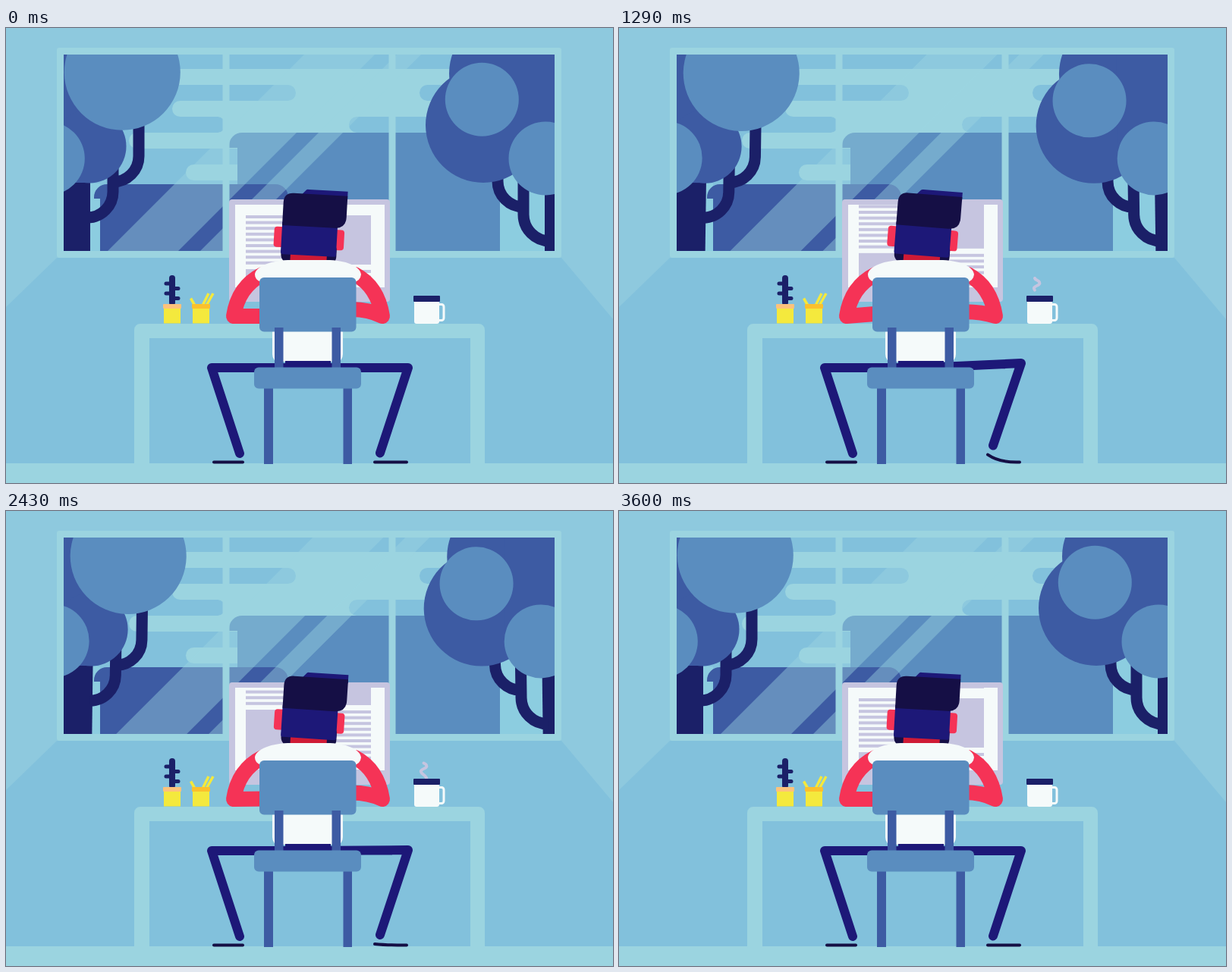
These frames come from a looping animation (800 by 600 pixels, 3630 ms). An HTML page:

```html
<!DOCTYPE html>
<html lang="en">
<head>
<meta charset="utf-8">
<title>At the desk</title>
<style>
html, body { margin: 0; width: 100%; height: 100%; overflow: hidden; background: #82c1dc }
svg { display: block; width: 800px; height: 600px }
.sky { fill: #82c1dc } .pale { fill: #9bd4e0 } .mid { fill: #5a8dbf } .deep { fill: #3d5ba3 }
.navy { fill: #1d1878 } .ink { fill: #150f45 } .white { fill: #f5fafa } .red { fill: #f53356 }
.lilac { fill: #c6c5e0 } .yellow { fill: #f4e93d } .wood { fill: #1b2068 }
.line { fill: none; stroke-linecap: round; stroke-linejoin: round }
.branch { fill: none; stroke: #1b2068; stroke-width: 15 }
.arm { stroke: #f53356; stroke-width: 20 }
.leg { stroke: #1d1878; stroke-width: 12 }
.foot { stroke: #150f45; stroke-width: 4 }
</style>
</head>
<body>
<svg viewBox="0 0 800 600">
  <defs>
    <clipPath id="pane"><path d="M76 35H723V294H76z"/></clipPath>
    <clipPath id="screen"><path d="M302 233H499V342H302z"/></clipPath>
  </defs>

  <!-- room -->
  <path class="sky" d="M0 0H800V600H0z"/>
  <path fill="#8ec9de" d="M0 0H800V384L732 303H67L0 368z"/>
  <path class="pale" d="M0 574H800V600H0z"/>

  <!-- view -->
  <g clip-path="url(#pane)">
    <path class="sky" d="M76 35H723V294H76z"/>
    <path fill="#8ccde0" d="M76 205H124V294H76zM651 138H723V294H651z"/>
    <g class="pale">
      <path d="M200 54H600V75H200zM280 54H600V138H280z"/>
      <rect x="219" y="96" width="381" height="21" rx="10.5"/>
      <rect x="162" y="138" width="180" height="21" rx="10.5"/>
      <rect x="237" y="180" width="90" height="21" rx="10.5"/>
    </g>
    <g class="sky">
      <rect x="150" y="75" width="232" height="21" rx="10.5"/>
      <rect x="545" y="75" width="80" height="21" rx="10.5"/>
      <rect x="150" y="117" width="139" height="21" rx="10.5"/>
      <rect x="452" y="117" width="130" height="21" rx="10.5"/>
    </g>
    <path class="mid" d="M294 158V155A17 17 0 0 1 311 138H651V294H305V158z"/>
    <path class="deep" d="M116 225V223A17 17 0 0 1 133 206H355A17 17 0 0 1 372 223V294H124V225z"/>
    <path id="glare" class="pale" opacity=".42" d="M393 35H486L227 294H134zM515 35H547L288 294H256z"/>

    <g class="trunk">
      <path class="wood" d="M66 195H111V300H66z"/>
      <path class="branch" d="M175 120V169a34 34 0 0 1-34 34M141 180V216a34 34 0 0 1-34 34"/>
    </g>
    <g class="shade deep">
      <path d="M70 15H150V156H110V204H70z"/>
      <circle cx="110" cy="156" r="48.5"/>
    </g>
    <g class="leaf mid">
      <circle cx="153.3" cy="58.3" r="76.5"/>
      <circle cx="55.3" cy="172" r="48.5"/>
    </g>

    <g class="trunk" data-side="-1">
      <path class="wood" d="M710 205H735V300H710z"/>
      <path class="branch" d="M648 185V202a34 34 0 0 0 34 34M682 195V246a35 35 0 0 0 35 35"/>
    </g>
    <g class="shade deep" data-side="-1">
      <circle cx="660.5" cy="60" r="76.5"/>
      <circle cx="629" cy="128" r="76"/>
      <path d="M660 15H731V172H660z"/>
    </g>
    <g class="leaf mid" data-side="-1">
      <circle cx="627.3" cy="94.3" r="48.5"/>
      <circle cx="711" cy="172" r="48.5"/>
    </g>
  </g>
  <path class="pale" fill-rule="evenodd" d="M70 26H729a3 3 0 0 1 3 3V300a3 3 0 0 1-3 3H70a3 3 0 0 1-3-3V29a3 3 0 0 1 3-3zM76 35V294H285.500V35zM294.500 35V294H504.500V35zM513.500 35V294H723V35z"/>

  <!-- monitor -->
  <rect class="lilac" x="294" y="226" width="212" height="135" rx="4"/>
  <path class="white" d="M302 233H499V342H302z"/>
  <g clip-path="url(#screen)"><g id="page" class="lilac"></g></g>

  <!-- desk and things on it -->
  <path class="pale" d="M169 574V398a8 8 0 0 1 8-8H623a8 8 0 0 1 8 8V574H612V409H189V574z"/>
  <g class="line" stroke="#1b2068">
    <path stroke-width="8" d="M219 330V362"/>
    <path stroke-width="5" d="M211 337H219M219 343.500H227M211 350H219M219 356.500H227"/>
  </g>
  <path fill="none" stroke="#f4e93d" stroke-width="3.500" d="M243.500 356.500L249 366M259 366L267 350M264 366L273 350"/>
  <path class="yellow" d="M208 368H230V389.500H208zM246 368H268V389.500H246z"/>
  <rect fill="#fcc27c" x="207" y="364" width="24" height="6" rx="1"/>
  <rect fill="#fbc02d" x="245" y="364" width="24" height="6" rx="1"/>
  <path id="steam" class="line" stroke="#c6c5e0" stroke-width="4" pathLength="100" d="M553 356C558 349 545 347 547 342.500C549 339 556 340 554 335C553 332.500 549 333 548 330"/>
  <path class="white" d="M538 359H571V387a3 3 0 0 1-3 3H541a3 3 0 0 1-3-3z"/>
  <rect class="line" x="565" y="364.500" width="12" height="21" rx="3" stroke="#f5fafa" stroke-width="3"/>
  <rect class="wood" x="537" y="353" width="35" height="8" rx="1"/>

  <!-- person -->
  <path id="armL" class="line arm"/>
  <path id="armR" class="line arm"/>
  <g id="head">
    <rect class="red" x="351" y="264" width="16" height="27" rx="4"/>
    <rect class="red" x="428" y="264" width="15.500" height="27" rx="4"/>
    <rect class="ink" x="361.500" y="280" width="73" height="32" rx="12"/>
    <path fill="#cf1a35" d="M374 298H422V312H374z"/>
    <path class="navy" d="M383 222L390 214Q391 213 393 213H445V224z"/>
    <path class="navy" d="M361 258H434V297a3 3 0 0 1-3 3H364a3 3 0 0 1-3-3z"/>
    <path class="ink" d="M361 262V232Q361 219 374 219H445V247Q445 262 430 262z"/>
  </g>
  <path class="white" d="M328 325C329 314 350 306 376 306H422C448 306 467 314 468 325Q467 333 459 335L444 350V430Q444 440 434 440H361Q351 440 351 430V350L336 335Q328 332 328 325z"/>
  <path class="navy" d="M368 439H428V452H368z"/>
  <path class="line leg" d="M400 448H271L308 561"/>
  <path id="legR" class="line leg"/>
  <path class="line foot" d="M274 572.500H312"/>
  <path id="footR" class="line foot"/>

  <!-- chair -->
  <rect class="mid" x="334" y="329" width="127.500" height="71.500" rx="6"/>
  <path class="deep" d="M354 395H365.500V450H354zM429.500 395H441V450H429.500zM340 474H352V575H340zM444.500 474H456V575H444.500z"/>
  <rect class="mid" x="327" y="447.500" width="141" height="28" rx="6"/>
</svg>

<script>
const LOOP = 3630, CYCLE = 3600, TAU = Math.PI * 2;
const $ = id => document.getElementById(id);
const set = (id, name, value) => $(id).setAttribute(name, value);
const clamp = x => Math.min(1, Math.max(0, x));
const ease = x => (x = clamp(x), x * x * (3 - 2 * x));

// page: a text column beside a picture, swapping sides
const rect = (x, y, w, h) => `<rect x="${x}" y="${y}" width="${w}" height="${h}"/>`;
const text = (x, y) => Array.from({ length: 9 }, (_, i) => rect(x, y + i * 7.6, 76, 4)).join('');
const picture = (x, y) => rect(x, y, 76, 65);
$('page').innerHTML = [0, 150].map(y =>
  text(316, 247 + y) + picture(405, 247 + y) +
  picture(316, 318 + y) + text(405, 319 + y)).join('');

function sway(cls, ripple, a) {
  const angle = 0.5 * (1 - Math.cos(a)) + ripple * (1 - Math.cos(2 * a));
  for (const el of document.querySelectorAll('.' + cls)) {
    const side = +el.dataset.side || 1;
    el.setAttribute('transform', `rotate(${side * angle} ${side > 0 ? 95 : 705} 480)`);
  }
}

function draw(t) {
  const a = TAU * t / CYCLE;
  sway('trunk', 0, a);
  sway('shade', -0.22, a);
  sway('leaf', 0.22, a);
  set('glare', 'transform', `translate(${7.7 * (1 - Math.cos(a))})`);

  const scroll = 56 * ease((t - 990) / 720) + 94 * ease((t - 2840) / 720);
  set('page', 'transform', `translate(0 ${-scroll})`);

  const nod = 0.6 + 4 * Math.cos(3 * a) + 2 * Math.sin(6 * a - Math.PI / 4);
  set('head', 'transform', `rotate(${nod} 398 315)`);

  // foot tap and typing share one beat
  const beat = (1 - Math.cos(12 * a)) / 2, lift = 15 * beat;
  set('legR', 'd', `M400 448L530 ${448 - 0.6 * lift}L493 ${560.5 - lift}`);
  set('footR', 'd', `M486 ${572.5 - lift}Q502 ${572.5 + 0.1 * lift} 528 572.500`);
  set('armL', 'd', `M338 325Q306 341 300 380L340 ${380 - 5 * beat}`);
  set('armR', 'd', `M460 325Q490 341 496 380Q478 ${371 + 5 * beat} 456 ${371 + 5 * beat}`);

  // steam grows from the lid, then leaves at the top
  const s = t % 1800;
  const front = 100 * Math.sin(clamp((s - 90) / 760) * Math.PI / 2);
  const tail = 100 * ease((s - 950) / 830);
  const length = Math.max(0, front - tail);
  set('steam', 'stroke-dasharray', `0 ${tail} ${length} 300`);
  set('steam', 'visibility', length > 0.5 ? 'visible' : 'hidden');
}

function tick() {
  draw(Math.min(performance.now() % LOOP, CYCLE));
  requestAnimationFrame(tick);
}
tick();
</script>
</body>
</html>
```
